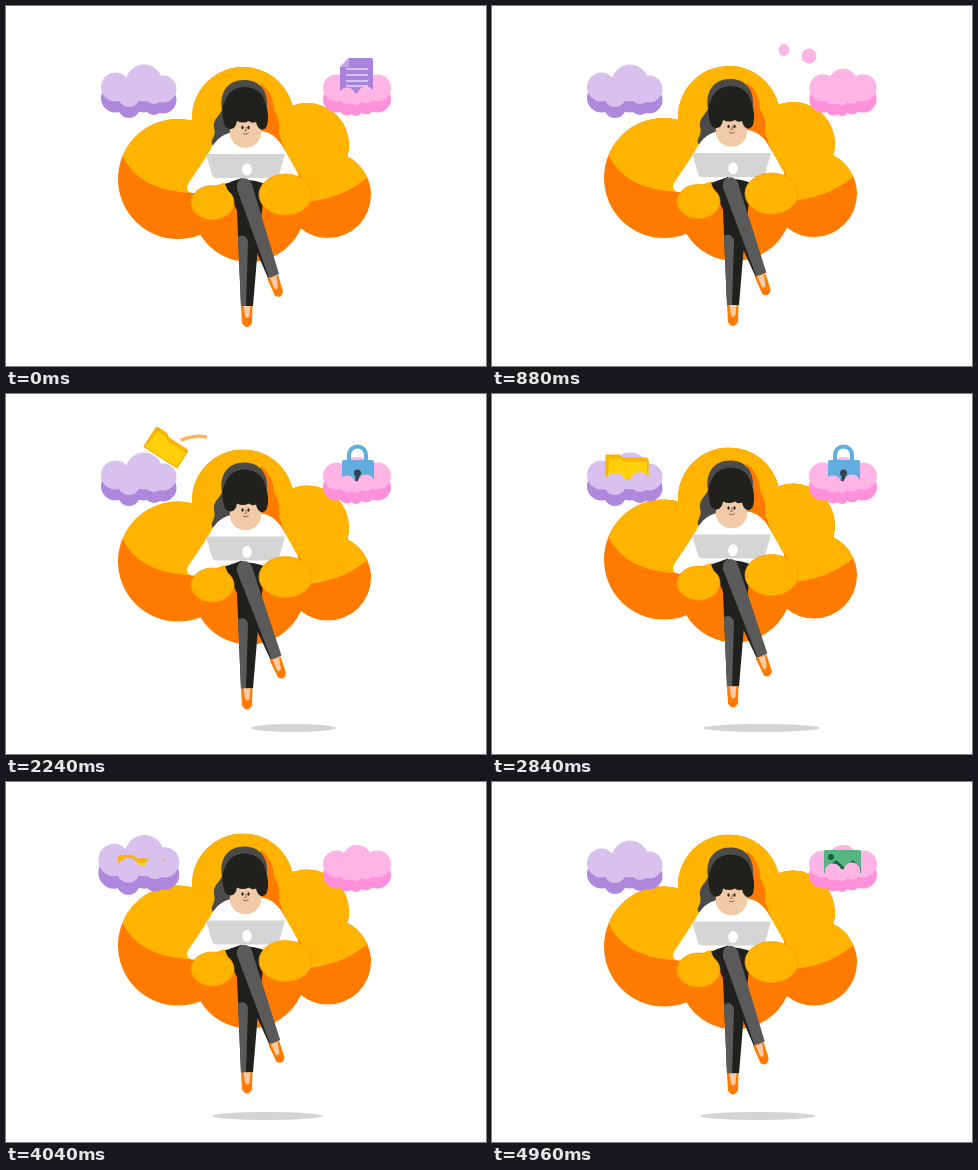
Animation of 480 by 360 pixels, one loop 5 s. Source, as an HTML page:

```html
<!DOCTYPE html>
<html lang="en">
<head>
<meta charset="utf-8">
<title>Working on a cloud</title>
<style>
html, body { margin: 0; width: 100%; height: 100%; overflow: hidden; background: #fff; }
svg { display: block; width: 100vw; height: 100vh; }
</style>
</head>
<body>
<svg viewBox="0 0 480 360">
<defs>
  <clipPath id="seat">
    <circle cx="172" cy="173" r="60"/><circle cx="237" cy="112" r="51"/>
    <circle cx="301" cy="139" r="42"/><circle cx="322" cy="189" r="43"/>
    <circle cx="243" cy="199" r="57"/>
  </clipPath>
  <clipPath id="pocketL"><path d="M80 0H190V86H80z"/></clipPath>
  <clipPath id="pocketR"><path d="M300 0H400V91H300z"/></clipPath>
  <g id="doc">
    <path d="M-8-18H14Q16-18 16-16V20H-17V-9z" fill="#a982dc"/>
    <path d="M-8-18V-9H-17z" fill="#c3a3ea"/>
    <path d="M-11-7H11M-11-1H11M-11 5H11M-11 10H11" stroke="#e6d6f8" stroke-width="1.5"/>
  </g>
  <g id="lock">
    <path d="M-8-2V-9A8.500 8.500 0 0 1 9-9V-2" fill="none" stroke="#62addf" stroke-width="4"/>
    <rect x="-15" y="-4" width="32" height="23" rx="2" fill="#62addf"/>
    <circle cx=".5" cy="9" r="3.500" fill="#34404c"/><path d="M-1 10H2L3 18H-2z" fill="#34404c"/>
  </g>
  <g id="photo">
    <rect x="-19" y="-2" width="37" height="24" rx="1.500" fill="#55b681"/>
    <circle cx="-12" cy="5" r="3" fill="#17623f"/>
    <path d="M-19 19L-7 8L2 16L10 8L18 16V22H-19z" fill="#17623f"/>
  </g>
  <g id="folder" stroke="#f5b400" stroke-linejoin="round">
    <path d="M-20-12H-8L-4-9H19Q21-9 21-7V13H-21V-11z" fill="#ffb400"/>
    <path d="M-18-9H-7L-3-6H21L20 13H-20z" fill="#ffcf0a"/>
  </g>
</defs>

<ellipse id="shadow" cy="334" ry="4" fill="#d4d4d4"/>

<g class="bob">
  <g clip-path="url(#seat)">
    <path d="M100 50H380V270H100z" fill="#ff7b00"/>
    <path d="M100 40V140L116 149Q132 185 187 187L240 192L306 195Q342 190 364 169L380 40z" fill="#ffb400"/>
    <path d="M255 77Q268 88 268 104Q275 114 273 127Q279 150 296 172H270L250 110z" fill="#ff7b00"/>
  </g>
  <path d="M216 104C213 86 222 74 238 74C253 74 262 84 261 100L240 130L214 140Q204 142 206 134Q210 127 208 122Q207 115 212 110z" fill="#4b4b4b"/>
  <path d="M223 127C210 131 206 141 202 148L182 178Q178 188 191 187L217 177H258L290 175Q295 170 290 164L277 141Q268 126 255 125z" fill="#fff"/>
  <circle cx="239.500" cy="126" r="15.800" fill="#f1caa8"/>
  <path d="M218 117Q214 104 219 95Q224 81 239 81Q255 82 259 96Q264 109 261 120Q258 125 254 123Q251 121 250 116Q246 118 243 115Q237 118 231 115Q230 122 225 123Q219 123 218 117z" fill="#20201d"/>
  <g fill="#20201d"><ellipse cx="236.500" cy="121.500" rx="1.100" ry="1.800"/><ellipse cx="242.500" cy="121.500" rx="1.100" ry="1.800"/></g>
  <path d="M240 121V125H238.500M237 127.500Q240 129.500 242.500 127" fill="none" stroke="#99604b"/>
</g>

<path id="trail" fill="none" stroke-width="3.500"/>
<use id="flyer"/>

<g class="bob">
  <path d="M219 178Q240 170 259 178L252 240L247 300H235L231 205z" fill="#20201d"/>
  <path d="M232 231Q239 227 242 235L240 300H235z" fill="#5a5a5a"/>
  <path d="M235 300H246.500L246 317Q241 325 236 317z" fill="#ff7b00"/>
  <path d="M237.500 300H244.500L243.500 310Q241 314 239 310z" fill="#f9cba6"/>
  <g id="shin">
    <path d="M224 176L236 172L272 268L262 272L229 196z" fill="#20201d"/>
    <path d="M231 183C229 170 245 168 247 182L273 268L263 272z" fill="#5a5a5a"/>
    <path d="M261 272L272 269L277 285Q276 293 269 290z" fill="#ff7b00"/>
    <path d="M264 272L270.500 270L272 281Q271 285 268 282z" fill="#f9cba6"/>
  </g>
  <path d="M200 148H279L273 169Q272 172 267 172H211Q207 172 206 169z" fill="#d5d5d5"/>
  <ellipse cx="241" cy="163.500" rx="4.800" ry="6" fill="#fff"/>
  <g fill="#ffb400" stroke="#ff9c00" stroke-width=".8">
    <ellipse cx="206.500" cy="196.500" rx="21.500" ry="17"/><ellipse cx="279.500" cy="188.500" rx="26.500" ry="20.500"/>
  </g>
</g>

<g id="cloudL"></g>
<g id="cloudR"></g>
<g fill="#ffb4e6"><ellipse id="dropA"/><ellipse id="dropB"/></g>
</svg>

<script>
const $ = id => document.getElementById(id);
const set = (el, attrs) => { for (const k in attrs) el.setAttribute(k, attrs[k]); };
const clamp = v => Math.max(0, Math.min(1, v));
const ease = v => (v = clamp(v), v * v * (3 - 2 * v));
const mix = (a, b, k) => a + (b - a) * k;
const pulse = (t, mid, width) => Math.exp(-(((t - mid) / width) ** 2));

const LOOP = 5000, STEP = 40;

const circles = (list, fill, dy = 0) => `<g fill="${fill}">` +
  list.map(([x, y, r]) => `<circle cx="${x}" cy="${y + dy}" r="${r}"/>`).join('') + '</g>';

// Items sit in a pocket between the rear puffs and the front puffs.
function buildCloud(side, rear, front, light, dark) {
  $('cloud' + side).innerHTML = circles([...rear, ...front], dark, 11) + circles(rear, light) +
    `<g clip-path="url(#pocket${side})"><use id="item${side}"/></g>` + circles(front, light);
}
buildCloud('L', [[109.5, 81, 14.5], [138, 77, 18.5], [157, 83, 13.5]],
  [[123, 90, 11], [148, 88, 10]], '#d8c1ee', '#ae88dc');
buildCloud('R', [[330.5, 82, 13.5], [351, 78, 15], [371.5, 82, 13.5]],
  [[341, 90, 8.5], [360, 89, 8.5], [350, 93, 6]], '#ffb4e6', '#ff90da');

const bezier = (p, u) => {
  const v = 1 - u;
  return [0, 1].map(i => v * v * v * p[0][i] + 3 * v * v * u * p[1][i] + 3 * v * u * u * p[2][i] + u * u * u * p[3][i]);
};
const inward = [[351, 70], [338, 0], [255, -10], [241, 140]];
const outward = [[241, 140], [235, 10], [178, 35], [135, 72]];

const flights = [
  { icon: 'doc', start: 580, length: 270, path: inward },
  { icon: 'folder', start: 1990, length: 310, path: outward },
  { icon: 'lock', start: 3180, length: 270, path: inward }
];
const launches = [['doc', 580], ['lock', 3180], ['photo', 5960]];

function place(el, icon, x, y, angle = 0, scale = 1) {
  set(el, { href: '#' + icon, transform: `translate(${x} ${y}) rotate(${angle}) scale(${scale})`, display: icon ? 'inline' : 'none' });
}

function drawFlight(t) {
  const f = flights.find(f => t >= f.start && t < f.start + f.length);
  set($('trail'), { display: f ? 'inline' : 'none' });
  if (!f) return place($('flyer'), '', 0, 0);
  const u = (t - f.start) / f.length, [x, y] = bezier(f.path, u), into = f.path === inward;
  place($('flyer'), f.icon, x, y, into ? -140 * u : 170 * (1 - u), into ? 1 - .25 * u : .7 + .3 * u);
  const from = clamp(u - (into ? .63 : .3)), to = clamp(u - (into ? .2 : .1));
  const points = Array.from({ length: 13 }, (_, i) => bezier(f.path, mix(from, to, i / 12)));
  set($('trail'), { d: 'M' + points.join('L'), stroke: into ? '#e3d0ee' : '#ffb45a' });
}

function drawDrops(phase) {
  const out = ease((phase - 40) / 180), k = Math.max(0, (phase - 220) / 80);
  const drop = (el, x, y, rx, ry) => set(el, {
    cx: x, cy: y, rx: Math.max(0, rx), ry: Math.max(0, ry),
    display: phase > 40 && phase < 420 ? 'inline' : 'none'
  });
  drop($('dropA'), mix(351, 321, out) - 29 * k, mix(75, 47, out) - 3 * k, 10 - 4.5 * k, 14 - 8 * k);
  drop($('dropB'), 351 - 34 * k, mix(75, 53, out) - 3 * k, 16 - 8.5 * k, 16 - 8.5 * k);
}

const scaleAt = (x, y, sx, sy) => `translate(${x} ${y}) scale(${sx} ${sy}) translate(${-x} ${-y})`;

function drawClouds(t) {
  const next = launches.find(([, start]) => t < start), wait = t - next[1];
  const rise = ease((wait + 1450) / 400);
  place($('itemR'), rise ? next[0] : '', 351, 70 + 32 * (1 - rise) - 6 * pulse(wait, -120, 110));
  const phase = t < 3000 ? t - 580 : t - 3180, squash = pulse(phase, 200, 70);
  set($('cloudR'), { transform: scaleAt(351, 90, 1 - .09 * squash, 1 + .05 * squash) });
  drawDrops(phase);

  const sink = 16 * ease((t - 3450) / 600) + 20 * ease((t - 4040) / 220);
  place($('itemL'), t >= 2300 && t < 4300 ? 'folder' : '', 135, 73 + sink);
  const swell = .05 * pulse(t, 3400, 300) + .24 * pulse(t, 4200, 145);
  set($('cloudL'), { transform: scaleAt(132, 105, 1 + swell, 1 + swell * 1.7) });
}

// Time, left edge and right edge of the ground shadow.
const shadowKeys = [[2000, 270, 320], [2240, 245, 330], [3400, 179, 325], [4040, 206, 316], [5000, 208, 324]];
function drawShadow(t) {
  const i = shadowKeys.findIndex(k => t < k[0]);
  set($('shadow'), { display: i > 0 ? 'inline' : 'none' });
  if (i < 1) return;
  const a = shadowKeys[i - 1], b = shadowKeys[i], k = (t - a[0]) / (b[0] - a[0]);
  const left = mix(a[1], b[1], k), right = mix(a[2], b[2], k);
  set($('shadow'), { cx: (left + right) / 2, rx: (right - left) / 2 });
}

function draw(now) {
  const t = Math.floor((now % LOOP) / STEP) * STEP;
  const lift = -4.75 * (1 - Math.cos(Math.PI * t / 4100));
  document.querySelectorAll('.bob').forEach(el => set(el, { transform: `translate(0 ${lift})` }));
  set($('shin'), { transform: `rotate(${-1.6 * Math.sin(Math.PI * t / 4800)} 238 178)` });
  drawShadow(t);
  drawFlight(t);
  drawClouds(t);
}

const begin = performance.now();
(function frame() {
  draw(performance.now() - begin);
  requestAnimationFrame(frame);
})();
</script>
</body>
</html>
```
